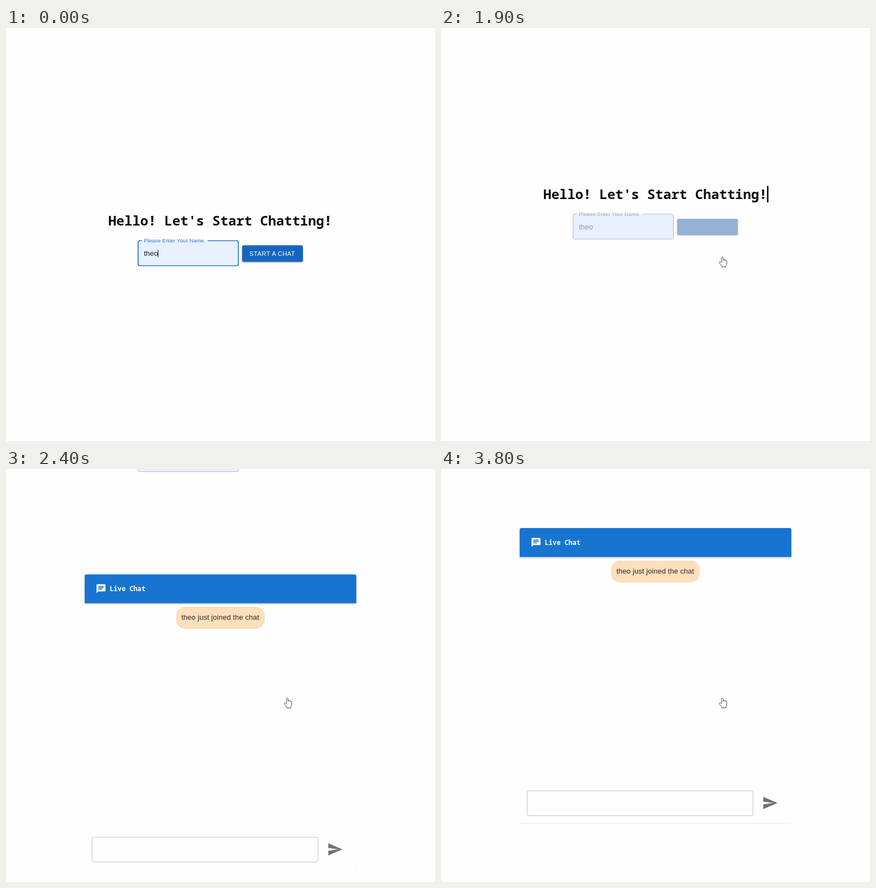
An HTML page for the animation above (4.2 s loop, 763x734 px).

```html
<!DOCTYPE html>
<html lang="en">
<head>
<meta charset="utf-8">
<title>Live chat</title>
<style>
  html, body { margin: 0; width: 100%; height: 100%; overflow: hidden; background: #fefefe; }
  svg { display: block; width: 763px; height: 734px; }
  text { white-space: pre; }
  .sans { font-family: "Liberation Sans", Arial, sans-serif; }
  .mono { font-family: "Noto Sans Mono", "DejaVu Sans Mono", monospace; }
  .body { font-size: 12.8px; letter-spacing: .12px; }
  .raised { filter: drop-shadow(0 1.4px 1.4px rgba(0,0,0,.32)); }
  .paper { filter: drop-shadow(0 .9px .6px rgba(0,0,0,.36)); }
</style>
</head>
<body>
<svg viewBox="0 0 763 734">
  <rect width="763" height="734" fill="#fefefe"/>

  <g id="form">
    <text class="mono" x="182" y="351" font-size="23.7" font-weight="700" fill="#0a0a0a">Hello! Let's Start Chatting!</text>
    <rect id="bar" x="579.8" y="328" width="2.6" height="29" fill="#000"/>

    <rect x="235" y="378" width="178.4" height="44.5" rx="3" fill="#e8f0fe"/>
    <path id="outline" fill="none"
      d="M242 378H238q-3 0-3 3V419.5q0 3 3 3H410.3q3 0 3-3V381q0-3-3-3H358.5"/>
    <text id="label" class="sans" x="245.2" y="381.3" font-size="9.6" letter-spacing=".09">Please Enter Your Name</text>
    <text id="name" class="sans body" x="245.2" y="405">theo</text>
    <rect id="caret" x="270" y="394" width="1" height="13.5" fill="#111"/>

    <rect id="button" x="420" y="386.2" width="108" height="29.4" rx="3.2"/>
    <text id="action" class="sans" x="432.8" y="405" font-size="11.2" letter-spacing=".32">START A CHAT</text>
  </g>

  <!-- Panel coordinates start at its top edge -->
  <g id="panel">
    <rect class="paper" x="140" y="0" width="483" height="524.5" rx="3.2" fill="#fefefe"/>
    <path class="raised" d="M140 51.2V3q0-3 3-3H620q3 0 3 3V51.2z" fill="#1874d1"/>
    <path transform="translate(159.4 15.8) scale(.8)" fill="#fff"
      d="M20 2H4c-1.1 0-2 .9-2 2v18l4-4h14c1.1 0 2-.9 2-2V4c0-1.1-.9-2-2-2zM6 9h12v2H6zm8 5H6v-2h8zm4-6H6V6h12z"/>
    <text class="mono" x="184.5" y="29.6" font-size="11.75" font-weight="600" fill="#fff">Live Chat</text>
    <rect class="paper" x="302.8" y="58" width="156.7" height="38.2" rx="16" fill="#fedfbb"/>
    <text class="sans body" x="381" y="81" text-anchor="middle" fill="#2d2823">theo just joined the chat</text>
    <rect x="153.2" y="466.9" width="401.6" height="44.2" rx="3.2" fill="none" stroke="#c3c3c3"/>
    <path transform="translate(570.8 474.2) scale(1.2)" fill="#737173" d="M2 21L23 12 2 3V10l15 2-15 2z"/>
  </g>

  <path id="hand" fill="#fff" stroke="#444" stroke-width=".95" stroke-linejoin="round"
    d="M499 417V408.6q0-1.5 1.4-1.5t1.4 1.5V412.6q0-1.3 1.2-1.2t1.2 1.4q0-1.1 1.1-.9t1.1 1.4q0-.9 .9-.7t.9 1.6V418q0 2.4-1.5 4.4V424.6H499.6V422.8L495.2 417.8q-1-1.3 .1-2t2 .1z"/>
</svg>
<script>
const LOOP = 4200, STEP = 100;
const CLICK = 1700, OPEN = 2000, SETTLED = 2800;

const $ = id => document.getElementById(id);
const set = (id, attrs) => {
  for (const [key, value] of Object.entries(attrs)) $(id).setAttribute(key, value);
};
const show = (id, on) => set(id, { visibility: on ? "visible" : "hidden" });
const move = (id, y) => set(id, { transform: `translate(0 ${y})` });
const clamp = x => Math.min(1, Math.max(0, x));
const mix = (a, b, k) => `rgb(${a.map((v, i) => Math.round(v + (b[i] - v) * k))})`;

// The form scrolls away on an S-curve; the panel eases out into place
const formY = t => t > CLICK ? -425 / (1 + Math.exp((2069 - t) / 81.3)) : 0;
const panelY = t => 105 + 353 * Math.pow(Math.max(0, SETTLED - t) / 700, 2.6);

// The heading bar fades in and out; the input caret blinks hard
const barAlpha = t => t > OPEN ? 0 : clamp(1.1 + 2.5 * Math.cos((t - 875) / 1300 * 2 * Math.PI));
const caretOn = t => t <= CLICK && Math.floor((t + 430) / 530) % 2 === 0;

function draw(t) {
  const off = t > CLICK;
  const k = clamp((t - 1750) / 240);
  const ink = 1 - .74 * k;

  move("form", formY(t));
  set("bar", { opacity: barAlpha(t) });
  show("caret", caretOn(t));

  set("outline", { stroke: off ? "#b5bac6" : "#2878cb", "stroke-width": off ? 1 : 1.7 });
  set("label", { fill: off ? "#a0a2a6" : "#2878cb" });
  set("name", { fill: off ? "#969ba4" : "#202124" });

  set("button", { fill: mix([21, 101, 192], [224, 224, 224], k) });
  $("button").style.filter = `drop-shadow(0 1.6px 1.8px rgba(0,0,0,${.36 * (1 - k)}))`;
  // White turns to translucent black
  const grey = 255 * (1 - k) / ink;
  set("action", { fill: `rgb(${grey},${grey},${grey})`, opacity: ink });

  show("panel", t >= OPEN);
  move("panel", panelY(t));
  show("hand", t >= CLICK);
}

const start = performance.now();
function tick() {
  const t = (performance.now() - start) % LOOP;
  draw(Math.floor(t / STEP) * STEP);
  requestAnimationFrame(tick);
}
tick();
</script>
</body>
</html>
```
